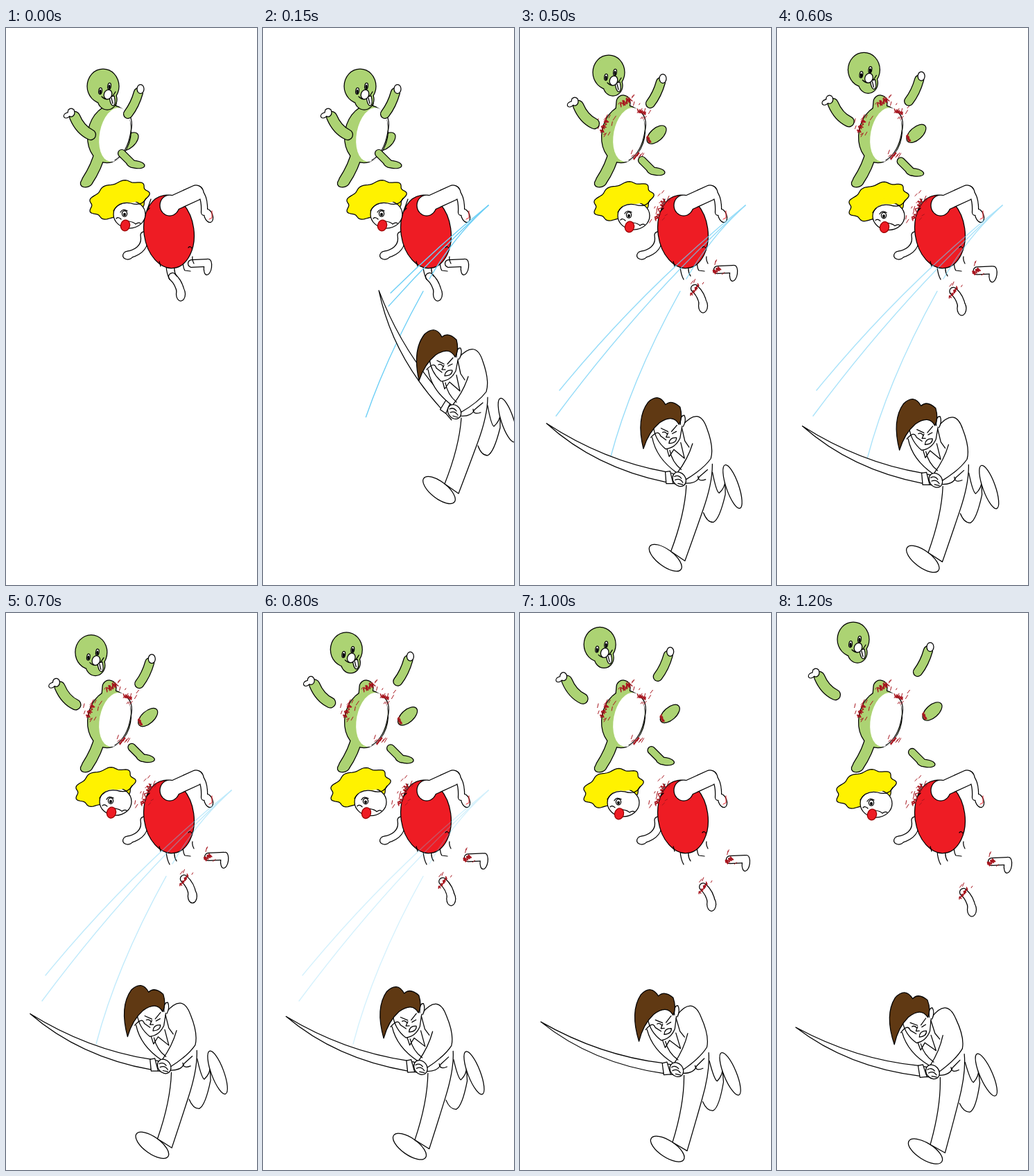
Animation of 362 by 804 pixels, one loop 1250 ms. Source, as an HTML page:

```html
<!DOCTYPE html>
<html lang="en">
<head>
<meta charset="utf-8">
<title>Slash</title>
<style>
html, body { margin: 0; width: 100%; height: 100%; overflow: hidden; background: #fff; }
svg { display: block; width: 100vw; height: 100vh; }
path, ellipse { stroke-linecap: round; stroke-linejoin: round; }
</style>
</head>
<body>
<svg id="stage" viewBox="0 0 362 804"></svg>
<script>
const GREEN = '#acd373', RED = '#ee1c24', YELLOW = '#fff200', BROWN = '#603913',
      BLOOD = '#a8161f', BLUE = '#6dcff6', WHITE = '#fff', INK = '#000';
const LOOP = 1250, STEP = 50, LAND = 250, CUT = 400, LINE = 1.25;
const stage = document.getElementById('stage');

function add(parent, tag, attrs = {}) {
  const el = document.createElementNS('http://www.w3.org/2000/svg', tag);
  for (const k in attrs) el.setAttribute(k, attrs[k]);
  return parent.appendChild(el);
}
const group = (parent = stage) => add(parent, 'g');
const path = (g, d, fill = 'none', stroke = INK, width = LINE, extra = {}) =>
  add(g, 'path', { d, fill, stroke, 'stroke-width': width, ...extra });
const oval = (g, cx, cy, rx, ry, turn = 0, fill = WHITE, stroke = INK, width = LINE) =>
  add(g, 'ellipse', { cx, cy, rx, ry, fill, stroke, 'stroke-width': width,
    transform: `rotate(${turn} ${cx} ${cy})` });

// Ovals [cx, cy, rx, ry, turn] and limbs [path, thickness, cap] merged under one outline
function merge(g, fill, ...items) {
  for (const [color, grow] of [[INK, LINE], [fill, -LINE]])
    for (const [a, b, c, e, turn] of items)
      if (typeof a === 'string')
        path(g, a, 'none', color, b + grow, { 'stroke-linecap': c || 'butt' });
      else
        oval(g, a, b, c + grow / 2, e + grow / 2, turn, color, 'none');
}

// Closed oval outline with regular bumps
function bumpy(cx, cy, rx, ry, turn, bumps, depth) {
  const c = Math.cos(turn), s = Math.sin(turn), pts = [];
  for (let i = 0; i < 90; i++) {
    const a = i / 90 * 2 * Math.PI, r = 1 + depth * Math.sin(bumps * a);
    const x = rx * r * Math.cos(a), y = ry * r * Math.sin(a);
    pts.push((cx + x * c - y * s).toFixed(1) + ' ' + (cy + x * s + y * c).toFixed(1));
  }
  return 'M' + pts.join('L') + 'Z';
}

let seed = 7;
const rand = () => (seed = seed * 16807 % 2147483647) / 2147483647;
const wounds = [];

// Scribble along a cut, with loose flecks around it
function wound(g, x1, y1, x2, y2, width, flecks = 3) {
  const box = group(g), len = Math.hypot(x2 - x1, y2 - y1);
  const at = (k, off) => (x1 + (x2 - x1) * k + (y1 - y2) / len * off).toFixed(1) + ' ' +
                         (y1 + (y2 - y1) * k + (x2 - x1) / len * off).toFixed(1);
  let scribble = 'M' + at(0, 0), spray = '';
  for (let i = 0; i < 16; i++)
    scribble += 'L' + at(i / 15 + (rand() - .5) * .3, (i % 2 - .5) * width * (.5 + rand() * .5));
  for (let i = 0; i < flecks; i++)
    spray += 'M' + at(rand() * 1.5 - .25, (rand() - .5) * (width + 16)) +
             `l${(1 + rand() * 3).toFixed(1)} ${(-2 - rand() * 4).toFixed(1)}`;
  path(box, scribble, 'none', BLOOD, 1.4);
  path(box, spray, 'none', BLOOD, 1);
  wounds.push(box);
}

// Severed parts: offset at 500 ms and at 1200 ms
const parts = [];
function part(x1, y1, x2, y2) {
  const g = group();
  parts.push({ g, x1, y1, x2, y2 });
  return g;
}

// Green creature
const tail = part(20, -10, 47, -22);
merge(tail, GREEN, [177, 164, 17, 9, -42]);
wound(tail, 164, 167, 167, 175, 4, 0);

const torso = group();
merge(torso, GREEN, [149, 153, 31, 42, 11], ['M147 130L149 107', 20], ['M136 178Q131 200 117 221', 16], [116, 223, 9, 6.5, -20]);
oval(torso, 157, 154, 22, 39.5, 11, WHITE, 'none');
path(torso, 'M172 120Q185 128 180 150Q175 180 157 191');
wound(torso, 145, 111, 160, 103, 9, 6);
wound(torso, 117, 151, 126, 131, 7, 11);
wound(torso, 170, 119, 182, 124, 5, 9);
wound(torso, 164, 189, 171, 181, 2, 7);

const armL = part(-15, -16, -38, -36);
merge(armL, GREEN, ['M122 154Q107 147 99 128', 15]);
merge(armL, WHITE, [94, 122, 5, 6, 0], [88, 126, 5, 3.5, -30]);

const armR = part(12, -15, 27, -39);
merge(armR, GREEN, ['M176 124Q186 111 191 93', 13]);
merge(armR, WHITE, [194, 88, 5, 6.5, 0]);

const leg = part(9, 10, 28, 20);
merge(leg, GREEN, ['M167 181L182 196', 11], [187, 197, 13, 5.5, 8]);

const head = part(-12, -20, -30, -46);
merge(head, GREEN, [140, 84, 23, 25, 0], [146, 103, 14, 15, 0]);
for (const [x, y] of [[136, 91], [149, 84]]) {
  oval(head, x, y, 2.3, 4.6, 8);
  oval(head, x, y + 1, 1, 2.4, 0, INK);
}
path(head, 'M138 99Q148 109 158 92');
path(head, 'M149 100Q151 113 155 112Q159 110 156 98Z', WHITE);
path(head, 'M152 101L154 109');
oval(head, 147, 96, 5.6, 7, 20);

// Clown
const foot1 = part(12, 17, 29, 44);
merge(foot1, WHITE, ['M240 359Q250 368 252 382', 11], [252, 384, 6.5, 10, 0]);
wound(foot1, 234, 369, 246, 353, 4);
const foot2 = part(17, 9, 42, 19);
merge(foot2, WHITE, ['M268 340L290 339', 11], [291, 345, 5.5, 11.5, 8]);
wound(foot2, 262, 344, 270, 338, 7);

const clown = group();
path(clown, 'M231 344Q232 356 236 363M243 344Q242 352 246 358M255 338Q256 348 258 350L266 351M269 330Q268 335 271 340');
merge(clown, WHITE, ['M199 299Q203 320 178 327', 10], [176, 328, 7.5, 6, -10]);
oval(clown, 235, 294, 36, 53, -8, RED);
merge(clown, WHITE, ['M239 254L274 238', 22, 'round'], [236, 256, 14, 15, 0],
  ['M280 238Q287 246 286 266', 9], [292, 271, 6, 10, -20]);
path(clown, 'M263 317Q266 314 268 318M221 337L223 344M209 247L203 264L207 260');
path(clown, 'M297 264L297 274L293 276', 'none', RED, 1);
wound(clown, 196, 278, 208, 248, 7, 13);

const face = part(-14, 2, -35, 6);
path(face, bumpy(163, 248, 43, 25, -.3, 9, .06), YELLOW);
oval(face, 178, 269, 23, 20);
path(face, 'M155 262Q164 249 180 252Q200 250 202 240L190 238L160 247Z', YELLOW, 'none');
path(face, 'M155 264Q163 250 180 253Q196 258 202 246');
oval(face, 171, 268, 3.6, 4.2);
oval(face, 171, 269, 1.3, 1.7, 0, INK);
path(face, 'M165 266Q168 260 175 264M159 275Q162 272 166 276M177 279Q184 280 187 283Q191 280 194 282');
oval(face, 172, 285, 6.5, 8, 15, RED, '#900');

// Blade trails
const trails = group();
for (const d of ['M325 256Q179 374 57 523', 'M325 256Q180 388 52 560',
                 'M325 256Q276 300 240 362M231 380Q160 508 130 622'])
  path(trails, d, 'none', BLUE, 1.4, { pathLength: 1, 'stroke-dasharray': '1 2' });

// Swordsman
const man = group();
const sword = group(man);
path(sword, 'M41 565Q122 620 212 638V653Q110 630 41 565Z', WHITE);
path(sword, 'M211 638L218 637L222 655L212 655ZM220 640L232 645M222 655L234 658', WHITE);

path(man, 'M279 640Q284 668 288 670Q297 662 297 652L297 672Q288 708 279 712Q270 712 265 698', WHITE);
oval(man, 307.5, 661, 33, 9, 72);
oval(man, 209, 762, 28, 12, 38);
path(man, 'M241 658Q238 700 217 753L237 767Q250 733 264 695Q279 655 279 628', WHITE);
path(man, 'M237 571Q262 544 272 576Q282 604 277 620Q266 635 240 650L228 640Q198 618 193 588', WHITE);
path(man, 'M195 572Q197 592 212 605Q226 604 233 590L237 570L225 556', WHITE);
path(man, 'M234 570Q234 556 240 557Q243 564 238 573', WHITE);
path(man, 'M180 604Q170 560 188 537Q204 523 213 541Q222 533 234 545Q238 560 232 570Q224 554 204 567Q188 580 180 604Z', BROWN);
path(man, 'M206 575L216 580M221 580L229 571M208 581Q212 579 215 584M222 583L228 580M216 582L213 588L218 588' +
  'M217 597Q218 588 228 589Q228 597 217 597M191 588Q202 576 205 586L213 592');
path(man, 'M214 605L217 616L224 606L239 619L234 596M236 575L240 594L246 603M251 598Q244 620 228 640' +
  'M218 607Q221 624 234 635M240 655Q256 656 260 646L272 636M258 645Q258 654 269 650');
oval(man, 231, 649, 9, 11, -35);
path(man, 'M224 645Q230 642 234 648M225 650Q232 647 236 654M229 655L236 657');

function draw(t) {
  const cut = t >= CUT, q = (t - 500) / 700;
  for (const { g, x1, y1, x2, y2 } of parts)
    g.setAttribute('transform', cut ? `translate(${x1 + (x2 - x1) * q} ${y1 + (y2 - y1) * q})` : '');
  for (const w of wounds) w.style.display = cut ? '' : 'none';

  // Leap in from the upper right, then a slow lean
  const k = Math.min(1, Math.max(0, (LAND - t) / 200));
  const lean = -5.8 * Math.max(0, (t - 350) / 850);
  man.style.display = t < STEP ? 'none' : '';
  man.setAttribute('transform', `translate(${90 * k} ${-190 * k}) rotate(${lean} 360 720)`);
  sword.setAttribute('transform', `rotate(${70 * k} 226 648)`);

  trails.style.opacity = t < 100 ? 0 : Math.max(0, Math.min(1, 1 - (t - 300) / 700));
  for (const p of trails.children) p.setAttribute('stroke-dashoffset', k);
}

const start = performance.now();
function tick(now) {
  const t = Math.max(0, now - start) % LOOP;
  draw(Math.floor(t / STEP) * STEP);
  requestAnimationFrame(tick);
}
draw(0);
requestAnimationFrame(tick);
</script>
</body>
</html>
```
